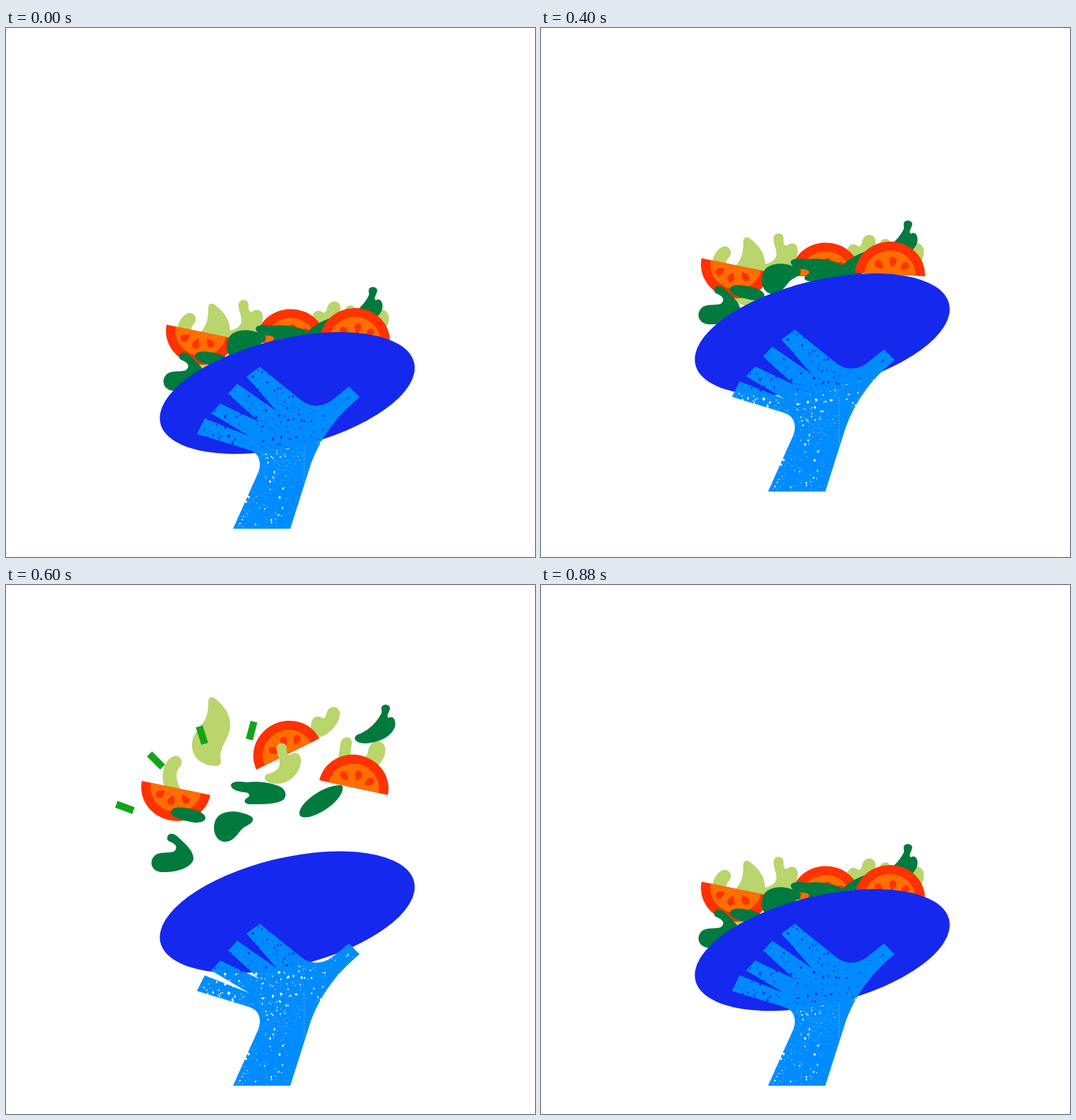
An HTML page that plays this animation: 748 by 748 pixels, repeating every 1.12 s.

```html
<!DOCTYPE html>
<html lang="en">
<head>
<meta charset="utf-8">
<title>Salad toss</title>
<style>
  html, body { margin: 0; width: 100%; height: 100%; overflow: hidden; background: #fff; }
  svg { display: block; width: 100%; height: 100%; }
</style>
</head>
<body>
<svg id="stage" viewBox="0 0 748 748">
  <defs>
    <g id="tomato">
      <path fill="#ff3200" d="M-49.5,0A49.5,46.5 0 0 1 49.5,0Z"/>
      <path fill="#ff6e00" d="M-36,0A36,34 0 0 1 36,0Z"/>
      <g id="seeds" fill="#ff3200"></g>
    </g>
    <mask id="grain" maskUnits="userSpaceOnUse" x="260" y="470" width="250" height="245">
      <rect x="260" y="470" width="250" height="245" fill="#fff"/>
      <path id="specks" fill="#000"/>
    </mask>
  </defs>
  <g id="food"></g>
  <g id="sparks" stroke="#12a518" stroke-width="10"></g>
  <g id="bowl">
    <ellipse rx="184.4" ry="76.6" fill="#1528ee" transform="translate(397.7 516.1) rotate(-13.5)"/>
  </g>
  <g id="hand">
    <path mask="url(#grain)" fill="#008cff" d="M321,708L356,630C361,619 361,603 345,597L270,574L281,552L344,577L290,545L303,531L358,557L314,517L327,503L383,542L340,493L359,479L417,526C431,537 447,536 460,527L485,507L500,522C461,554 440,589 429,623L402,708Z"/>
  </g>
</svg>
<script>
const LOOP = 1120, STEP = 40;
const LIME = '#b9d56c', GREEN = '#007a3d';
const $ = id => document.getElementById(id);

function add(parent, tag, attrs = {}) {
  const el = document.createElementNS('http://www.w3.org/2000/svg', tag);
  for (const k in attrs) el.setAttribute(k, attrs[k]);
  return parent.appendChild(el);
}

// Keys are [ms, value], joined by straight lines.
const tracks = {
  hand: [[200, 0], [440, -63], [600, 0]],
  bowl: [[200, 0], [280, -21], [320, -35], [440, -107], [480, -121], [520, -107], [680, 0]],
  food: [[200, 0], [280, -21], [320, -35], [360, -63], [440, -125], [480, -144],
         [520, -136], [560, -107], [600, -76], [680, 0]],
  spread: [[400, 0], [440, .18], [600, 1], [680, 1], [880, 0]],
  head: [[480, 0], [680, 1]],
  tail: [[680, 0], [880, 1]]
};

function at(name, t) {
  const keys = tracks[name];
  if (t <= keys[0][0]) return keys[0][1];
  for (let i = 1; i < keys.length; i++) {
    const [t0, a] = keys[i - 1], [t1, b] = keys[i];
    if (t <= t1) return a + (b - a) * (t - t0) / (t1 - t0);
  }
  return keys[keys.length - 1][1];
}

// Drawn in the scattered pose; move = [dx, dy, turn, pivotX, pivotY] back to the bowl.
const leaf = (fill, d, ...move) => ({ tag: 'path', attrs: { fill, d }, move });
const tomato = (x, y, angle, dx, dy, turn) => ({
  tag: 'use',
  attrs: { href: '#tomato', transform: `translate(${x} ${y}) rotate(${angle})` },
  move: [dx, dy, turn, x, y]
});

const pieces = [
  leaf(LIME, 'M238,318C246,316 252,326 246,333C239,340 240,352 246,362C248,372 228,372 224,360C218,348 223,322 238,318Z', 20, 85),
  leaf(LIME, 'M286,241C286,234 292,233 296,237C306,245 317,256 317,274C317,292 303,302 303,320C305,326 304,331 298,332C279,332 263,322 263,302C263,284 279,276 284,260C286,252 286,248 286,241Z', 0, 155),
  leaf(LIME, 'M455,253C461,245 472,248 472,258C472,272 456,290 440,292C428,292 428,262 440,262C448,262 448,268 452,262C453,259 453,256 455,253Z', 1, 138),
  leaf(LIME, 'M473,300C475,289 489,288 489,299C488,310 486,315 490,322C497,330 508,325 512,312C513,303 518,297 526,297C537,298 538,310 535,318C530,332 515,340 500,342C480,346 475,353 462,353C452,352 452,345 460,340C472,330 470,312 473,300Z', 5, 101),
  leaf(GREEN, 'M531,249C532,244 542,244 543,250C542,257 537,261 541,264C547,260 552,267 550,276C546,290 528,299 508,300C496,300 489,294 496,288C512,283 524,270 530,259C533,254 530,253 531,249Z', -18, 121),
  tomato(398.5, 315, -26.3, 4, 129, 24.8),
  leaf(LIME, 'M383,305C384,298 396,297 397,306C396,314 399,319 404,315C411,311 418,316 417,325C416,341 402,357 384,357C370,358 362,350 368,344C378,341 387,338 387,328C386,318 382,313 383,305Z', -54, 85),
  tomato(240.5, 363, 191.6, 35, 66.5, 0),
  leaf(GREEN, 'M476,361C478,372 462,390 440,400C425,407 413,406 415,397C417,385 440,366 460,361C468,359 475,358 476,361Z', 0, 49),
  tomato(491.5, 362.5, 12.2, 2, 80, -9.4),
  leaf(GREEN, 'M318,359C319,354 328,353 340,355C355,353 372,355 385,360C396,364 398,374 392,380C380,387 360,386 345,386C337,386 335,380 341,377C347,374 344,369 336,369C328,368 318,365 318,359Z', 35, 66),
  leaf(GREEN, 'M349,406C351,411 343,415 336,419C328,425 324,439 309,439C296,438 291,422 296,409C301,396 320,394 333,398C340,400 347,402 349,406Z', 18, 31),
  leaf(GREEN, 'M233,396C235,389 248,390 258,392C270,394 283,399 282,406C280,413 267,413 257,410C246,408 232,403 233,396Z', 34, 67),
  leaf(GREEN, 'M228,434C228,426 237,426 243,432C253,442 266,452 265,464C262,476 240,483 220,482C206,481 202,468 209,460C215,452 229,456 237,453C242,450 242,444 236,441C232,438 228,439 228,434Z', 17, 31)
];

for (const [x, y, a] of [[-16, -13, -46], [3, -18, 6], [20, -12.5, 46]]) {
  add($('seeds'), 'path', {
    d: 'M0,8C-3,4 -5,1 -5,-2A5,5 0 0 1 5,-2C5,1 3,4 0,8Z',
    transform: `translate(${x} ${y}) rotate(${a})`
  });
}

for (const p of pieces) {
  p.el = add($('food'), 'g');
  add(p.el, p.tag, p.attrs);
}

// Inner end, outer end
const sparks = [
  [180.2, 319, 139.8, 304],
  [221.5, 257.5, 190.5, 226.5],
  [281, 224.6, 268, 183.4],
  [344, 218.5, 355, 176.5]
].map(ends => ({ ends, el: add($('sparks'), 'line') }));

// Worn print: seeded specks, thick at the wrist and thin towards thumb and outer arm.
function grain() {
  let seed = 77;
  const rnd = () => (seed = (seed * 16807) % 2147483647) / 2147483647;
  let d = '';
  for (let i = 0; i < 1500; i++) {
    const x = 272 + rnd() * 222, y = 480 + rnd() * 226;
    const size = .35 + 1.35 * rnd() ** 4, turn = rnd() * 6.28, keep = rnd();
    const edge = 419 - Math.max(0, y - 600) * .3;
    const density = y > 590 ? (x > edge ? .1 : y > 640 ? .7 : 1) : x > 425 ? .45 : .85;
    if (keep > density) continue;
    for (let k = 0; k < 5; k++) {
      const a = turn + k * 1.257, r = size * (.6 + rnd());
      d += (k ? 'L' : 'M') + (x + r * Math.cos(a)).toFixed(1) + ',' + (y + 1.2 * r * Math.sin(a)).toFixed(1);
    }
    d += 'Z';
  }
  for (let y = 575; y < 640; y += 4) d += `M421,${y}h.6v1.2h-.6Z`;
  $('specks').setAttribute('d', d);
}

function draw(ms) {
  const t = Math.floor((ms % LOOP) / STEP) * STEP;
  for (const id of ['hand', 'bowl', 'food']) {
    $(id).setAttribute('transform', `translate(0 ${at(id, t)})`);
  }

  const k = 1 - at('spread', t);
  for (const { el, move: [dx, dy, turn = 0, px = 0, py = 0] } of pieces) {
    el.setAttribute('transform', `translate(${dx * k} ${dy * k}) rotate(${turn * k} ${px} ${py})`);
  }

  const head = at('head', t), tail = at('tail', t);
  $('sparks').style.display = head > tail ? '' : 'none';
  for (const { el, ends: [x0, y0, x1, y1] } of sparks) {
    const put = (n, f) => {
      el.setAttribute('x' + n, x0 + (x1 - x0) * f);
      el.setAttribute('y' + n, y0 + (y1 - y0) * f);
    };
    put(1, tail);
    put(2, head);
  }
}

grain();
const start = performance.now();
function tick() {
  draw(performance.now() - start);
  requestAnimationFrame(tick);
}
tick();
</script>
</body>
</html>
```
